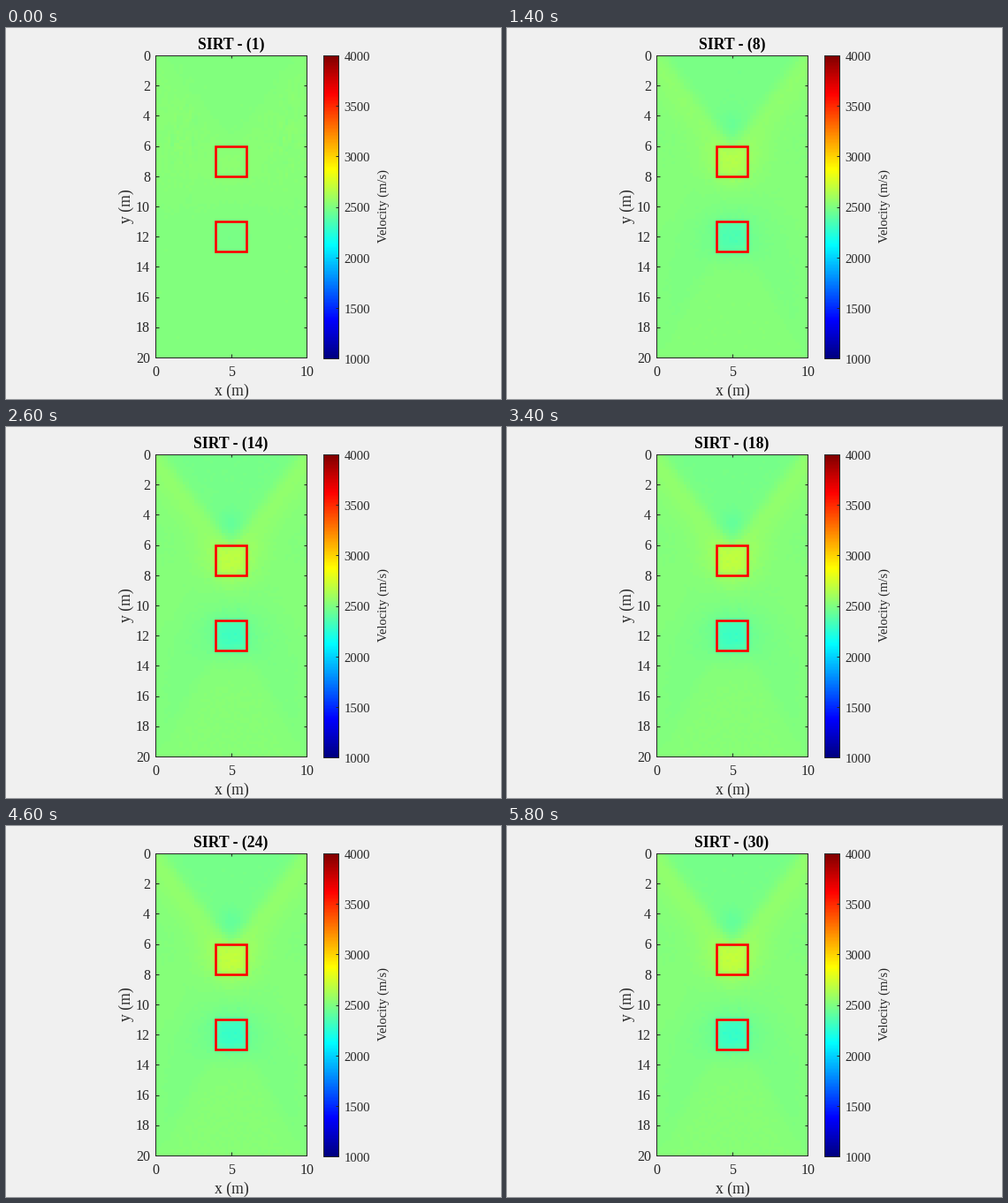
Write a matplotlib script that moves like this. It is 560 px wide and 420 px high and loops after 6 s.

```python
import numpy as np
import matplotlib.pyplot as plt
from matplotlib.animation import FuncAnimation
from matplotlib.colors import ListedColormap
from matplotlib.patches import Rectangle

W, H, DPI = 560, 420, 100
FRAMES, INTERVAL = 30, 200
LEFT, TOP, RIGHT, BOTTOM = 169, 31, 340, 373
BAR = (359, 31, 376, 374)
VMIN, VMAX = 1000, 4000
INK = "#262626"
SCALE = (RIGHT - LEFT) / 10

plt.rcParams["font.family"] = "Liberation Serif"

# Jet ramp
ramp = np.linspace(0, 1, 256)
jet = ListedColormap(np.stack(
    [np.clip(1.5 - np.abs(4 * ramp - c), 0, 1) for c in (3, 2, 1)], axis=1))

# Velocity model on 0.2 m cells
rng = np.random.default_rng(7)
NX, NY = 50, 100
x, y = np.meshgrid((np.arange(NX) + 0.5) / 5, (np.arange(NY) + 0.5) / 5)
d = np.abs(x - 5)


def bump(cx, cy, sx, sy):
    return np.exp(-((x - cx) / sx) ** 2 - ((y - cy) / sy) ** 2)


def step(v, width):
    return 1 / (1 + np.exp(-np.clip(v / width, -40, 40)))


def block(cy):
    return step(1 - d, 0.13) * step(1 - np.abs(y - cy), 0.13)


u = d - 0.76 * (6.1 - y)
outside = step(u, 0.3)
arms = outside * np.exp(-(u / 2.1) ** 2) * step(9 - y, 0.5)
cone = step(1 + 0.55 * (y - 13) - d, 0.3) * step(y - 13, 0.3)
flanks = (1 - cone) * step(y - 10.5, 0.7) * step(4.4 - d, 0.4)
sides = step(d - 3.2, 0.4) * bump(5, 10, 50, 2.5)

wide = (58 * arms - 34 * (1 - outside) - 50 * bump(5, 4.7, 1, 1.1)
        + 75 * bump(5, 7, 2, 1.6) - 75 * bump(5, 12, 1.8, 1.6)
        + 16 * cone - 16 * flanks + 15 * sides)
sharp = 80 * block(7) - 140 * block(12) - 15 * bump(5, 4.6, 0.7, 0.7)

grain = rng.normal(0, 1, (NY, NX))
streaks = (grain + np.roll(grain, 1, 0) + np.roll(grain, 2, 0)) / 1.7
ray_zone = bump(1.8, 5.5, 1.2, 2.8) + bump(8.7, 5.5, 1.2, 2.8)
near = bump(5, 7, 2.2, 1.8) + bump(5, 12, 2.2, 1.8)
specks = (rng.random((NY, NX)) < 0.1) * near
first = (16 * outside * step(9.5 - y, 0.6) + 14 * bump(5, 7, 1.5, 1.3)
         - 22 * block(12) - 8 * bump(5, 12, 2, 2))


def velocity(n):
    t = n - 1
    fade = np.exp(-t / 4)
    v = 2508 + first * fade + wide * (1 - fade)
    v += sharp * (1 - np.exp(-t / 9))
    v += 10 * streaks * ray_zone * fade
    v += grain * (1.5 + 3 * near * (1 - fade)) - 22 * specks * (1 - fade)
    return v


fig = plt.figure(figsize=(W / DPI, H / DPI), dpi=DPI, facecolor="#f0f0f0")
ax = fig.add_axes([0, 0, 1, 1])
ax.axis("off")


def label(px, py, s, size, ha="center", **kw):
    kw.setdefault("color", INK)
    return ax.text(px, py, s, fontsize=size * 72 / DPI, ha=ha, va="baseline",
                   rotation_mode="anchor", **kw)


def line(xs, ys):
    ax.plot(xs, ys, color=INK, lw=0.72, solid_capstyle="butt", zorder=4)


def frame(x0, y0, x1, y1):
    ax.add_patch(Rectangle((x0, y0), x1 - x0, y1 - y0, fill=False,
                           ec=INK, lw=0.72, zorder=4))


def image(data, box, **kw):
    x0, y0, x1, y1 = box
    return ax.imshow(data, cmap=jet, extent=(x0, x1, y1, y0), aspect="auto",
                     interpolation="nearest", **kw)


field = image(velocity(1), (LEFT, TOP, RIGHT, BOTTOM), vmin=VMIN, vmax=VMAX)
image(ramp[::-1, None], BAR, vmin=0, vmax=1)
frame(LEFT, TOP, RIGHT, BOTTOM)
frame(*BAR)

for v in range(0, 21, 2):
    py = TOP + v * (BOTTOM - TOP) / 20
    line([LEFT, LEFT + 4], [py, py])
    line([RIGHT - 3, RIGHT], [py, py])
    label(163, py + 5.7, str(v), 16, "right")
for v in (0, 5, 10):
    px = LEFT + v * SCALE
    line([px, px], [TOP, TOP + 3])
    line([px, px], [BOTTOM - 4, BOTTOM])
    label(px + 0.5, 394, str(v), 16)
for v in range(VMIN, VMAX + 1, 500):
    py = BAR[3] - (v - VMIN) / (VMAX - VMIN) * (BAR[3] - BAR[1])
    line([BAR[2] - 3, BAR[2]], [py, py])
    label(382.5, py + 6, str(v), 14.8, "left")

for cy in (6, 11):
    ax.add_patch(Rectangle((LEFT + 4 * SCALE, TOP + cy * SCALE),
                           2 * SCALE, 2 * SCALE, fill=False, ec="red",
                           lw=1.92, joinstyle="miter", zorder=5))

label(255, 416, "x (m)", 17.6)
label(141, 201.5, "y (m)", 17.6, rotation=90)
label(431, 201.5, "Velocity (m/s)", 14.6, rotation=90)
title = label(254.5, 24, "", 17.6, weight="bold", color="black")
ax.set_xlim(0, W)
ax.set_ylim(H, 0)


def update(i):
    field.set_data(velocity(i + 1))
    title.set_text(f"SIRT - ({i + 1})")
    return field, title


anim = FuncAnimation(fig, update, frames=FRAMES, interval=INTERVAL,
                     repeat=True, repeat_delay=0)
plt.show()
```
